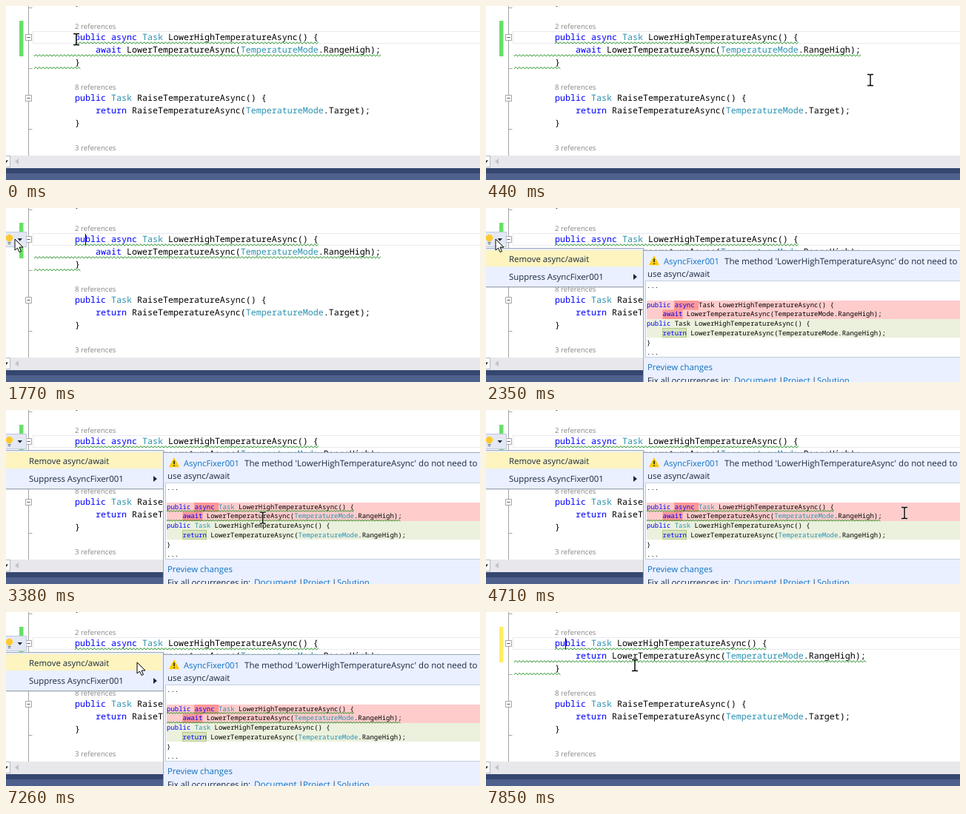
Animation, 640 px wide and 235 px high, one loop 8000 ms. Source, as an HTML page:

```html
<!DOCTYPE html>
<html lang="en">
<head>
<meta charset="utf-8">
<title>Code fix preview</title>
<style>
  html, body { margin: 0; width: 100%; height: 100%; overflow: hidden; background: #fff; }
  svg { display: block; width: 640px; height: 235px; }
  text { white-space: pre; text-rendering: geometricPrecision; }
  .code { font: 11.67px "Noto Sans Mono", "DejaVu Sans Mono", monospace; }
  .small { font-size: 8.98px; }
  .ui { font: 11.4px "Open Sans", "Noto Sans", sans-serif; fill: #1b293e; }
  .lens { font: 9.65px "Open Sans", "Noto Sans", sans-serif; fill: #868686; }
  .link { fill: #0e70c0; }
  .key { fill: #0000ff; }
  .type { fill: #2b91af; }
  .wave { fill: none; stroke: #1c8f1c; stroke-width: 1; }
  .fold { fill: #fff; stroke: #a5a5a5; }
  .plain .type { fill: #000; }
  .plain .wave { display: none; }
</style>
</head>
<body>
<svg viewBox="0 0 640 235">
  <rect width="640" height="235" fill="#fff"/>
  <rect x="36.5" y="34.5" width="610" height="16" fill="none" stroke="#eaeaf2"/>
  <path class="fold" d="M30.5 0V203M30.5 2.5h5M30.5 84.5h5M30.5 166.5h5"/>
  <path class="fold" d="M26.5 38.5h8v8h-8zM26.5 120.5h8v8h-8z"/>
  <path d="M28.5 42.5h4M28.5 124.5h4" stroke="#555"/>
  <rect id="bar" x="18" y="20" width="5.500" height="48"/>

  <g class="lens">
    <text x="93" y="31">2 references</text>
    <text x="93" y="113">8 references</text>
    <text x="93" y="195">3 references</text>
  </g>
  <g id="editor" class="code"></g>
  <g id="before" class="code"></g>
  <g id="after" class="code"></g>
  <path id="caret" d="M107.5 35V50" stroke="#000"/>

  <rect y="202" width="640" height="17" fill="#e8e8ec"/>
  <rect x="-4.5" y="202.5" width="10" height="15" fill="#fcfcfc" stroke="#b4b8c4"/>
  <path d="M-3 208.500h6l-3 3.500z" fill="#1e1e1e"/>
  <path d="M17 206v8l-5-4z" fill="#c2c3c9"/>
  <rect y="219" width="640" height="7" fill="#35476f"/>
  <rect y="226" width="640" height="9" fill="#4e608c"/>

  <g id="bulb">
    <rect x="-2.500" y="32.500" width="30" height="20" fill="#e3e8f3" stroke="#c0c9dd"/>
    <circle cx="4.500" cy="40.500" r="4.700" fill="#ffc92e"/>
    <path d="M2.500 43h4v2h-4z" fill="#ffc92e"/>
    <path d="M2.500 46.500h4M3 48.500h3" stroke="#666"/>
    <path d="M15.500 41h6.500l-3.250 3.700z" fill="#1b293e"/>
  </g>

  <g id="menu">
    <rect x="-1" y="56" width="215" height="52" fill="#000" opacity=".1"/>
    <rect x="-2" y="54.500" width="214.500" height="52" fill="#eaf0ff" stroke="#9ba7b7"/>
    <rect y="57" width="211" height="22" fill="#fdf4bf"/>
    <text class="ui" x="31" y="72.500">Remove async/await</text>
    <text class="ui" x="31" y="97">Suppress AsyncFixer001</text>
    <path d="M199 89v8l5-4z" fill="#1b293e"/>
  </g>

  <g id="popup">
    <rect x="212.500" y="57.500" width="440" height="190" fill="#eaf0ff" stroke="#9ba7b7"/>
    <rect x="215.500" y="98.500" width="440" height="103" fill="#fff" stroke="#c5cede"/>
    <path d="M227 65.500l6 11h-12z" fill="#ffcc00" stroke="#ffcc00" stroke-width="1.500" stroke-linejoin="round"/>
    <path d="M227 68.500v4.500M227 74.500v1.500" stroke="#111" stroke-width="1.500"/>
    <g class="ui">
      <text class="link" x="240" y="76" style="font-size:11.250px">AsyncFixer001</text>
      <text x="322" y="76" style="font-size:11.550px">The method 'LowerHighTemperatureAsync' do not need to</text>
      <text x="218" y="92.500">use async/await</text>
      <text class="link" x="218" y="218.500">Preview changes</text>
      <text x="218" y="237" style="font-size:11.300px">Fix all occurrences in:</text>
      <text class="link" x="335" y="237" style="font-size:11.800px">Document</text>
      <text x="395" y="237">|</text>
      <text class="link" x="401" y="237">Project</text>
      <text x="440" y="237">|</text>
      <text class="link" x="447" y="237">Solution</text>
    </g>
    <rect x="217" y="125" width="423" height="25" fill="#ffcccc"/>
    <path d="M254 125h33v12.500h-33zM238.500 137.500h27v12.500h-27z" fill="#ff9797"/>
    <rect x="217" y="150" width="423" height="25" fill="#ebf1dd"/>
    <rect x="238.500" y="162.500" width="32" height="12" fill="#d7e3bc" stroke="#b5c98a"/>
    <g id="diff" class="code small"></g>
  </g>

  <g id="pointer">
    <path id="arrow" d="M0 0V15L3.500 12L6 17.500L8.500 16.500L6 11H11Z" fill="#fff" stroke="#000" stroke-linejoin="round"/>
    <g id="beam" fill="none">
      <path d="M-4 -7.500H4M-4 7.500H4M0 -7.500V7.500" stroke="#fff" stroke-width="3" opacity=".6"/>
      <path d="M-4 -7.500H-1L0 -6.500L1 -7.500H4M-4 7.500H-1L0 6.500L1 7.500H4M0 -7V7" stroke="#000" stroke-width="1.400"/>
    </g>
  </g>
</svg>
<script>
const el = id => document.getElementById(id);

const paint = line => line
  .replace(/\b(public|async|await|return)\b/g, '<tspan class=key>$1</tspan>')
  .replace(/\b(Task|TemperatureMode)\b/g, '<tspan class=type>$1</tspan>')
  .replace(/class=(\w+)/g, 'class="$1"');

function code(id, x, lines) {
  el(id).innerHTML += lines.map(([y, line]) => `<text x="${x}" y="${y}">${paint(line)}</text>`).join('');
}

function wave(id, y, from, to, step, height) {
  let d = `M${from} ${y + height}`;
  for (let x = from + step, i = 0; x <= to; x += step, i++) d += `L${x} ${y + (i % 2) * height}`;
  el(id).innerHTML += `<path class="wave" d="${d}"/>`;
}

const oldHead = 'public async Task LowerHighTemperatureAsync() {';
const newHead = 'public Task LowerHighTemperatureAsync() {';
const oldBody = '    await LowerTemperatureAsync(TemperatureMode.RangeHigh);';
const newBody = '    return LowerTemperatureAsync(TemperatureMode.RangeHigh);';

code('editor', 93, [
  [-1, '}'], [80, '}'],
  [128, 'public Task RaiseTemperatureAsync() {'],
  [145, '    return RaiseTemperatureAsync(TemperatureMode.Target);'],
  [162, '}']
]);
wave('editor', 82.5, 38, 102, 2.4, 2.2);

for (const [id, head, body, headEnd, bodyEnd] of [
  ['before', oldHead, oldBody, 422, 508],
  ['after', newHead, newBody, 380, 515]
]) {
  code(id, 93, [[46, head], [63, body]]);
  wave(id, 48.7, 93, headEnd, 2.4, 2.2);
  wave(id, 65.7, 38, bodyEnd, 2.4, 2.2);
}

code('diff', 217, [
  [108, '...'], [133.5, oldHead], [146, oldBody],
  [159, newHead], [171.5, newBody], [184.5, '}'], [197.5, '...']
]);
wave('diff', 135.7, 217, 470, 1.9, 1.5);
wave('diff', 148.5, 217, 533, 1.9, 1.5);

// Pointer path: tick, x, y
const path = [
  [0, 95, 45], [1, 130, 48], [2, 330, 62], [3, 519, 100], [4, 250, 141], [5, 43, 42],
  [6, 20, 44], [8, 2, 46], [9, 2, 46], [12, 12, 42], [16, 13, 42], [17, 29, 57],
  [19, 180, 70], [22, 400, 140], [25, 240, 157], [26, 220, 115], [28, 440, 160],
  [29, 400, 208], [31, 571, 160], [32, 565, 139], [35, 565, 139], [36, 588, 186],
  [43, 440, 174], [46, 300, 115], [49, 177, 68], [50, 177, 68], [53, 201, 72]
];

function locate(tick) {
  const next = path.findIndex(p => p[0] >= tick);
  const b = path[next], a = path[Math.max(0, next - 1)];
  const k = b === a ? 0 : (tick - a[0]) / (b[0] - a[0]);
  return [a[1] + (b[1] - a[1]) * k, a[2] + (b[2] - a[2]) * k];
}

const show = (id, on) => el(id).style.display = on ? '' : 'none';

function draw(now) {
  const tick = Math.min(53, Math.floor((now % 8000 + 25) / 147.8));
  const [x, y] = locate(tick);
  const open = tick >= 14 && tick < 50;
  const fixed = tick >= 51;
  const overText = open ? x > 214 && y > 99 && y < 185 : x > 36;

  show('before', !fixed);
  show('after', fixed);
  el('bar').setAttribute('fill', fixed ? '#ffee62' : '#66e066');
  show('bulb', tick >= 10 && tick < 50);
  show('menu', open);
  show('popup', tick >= 15 && tick < 50);
  // The preview gets its type colours and squiggles a moment after opening.
  el('diff').classList.toggle('plain', tick < 19);
  show('caret', (tick >= 4 && tick < 7) || (tick >= 10 && tick < 14) || fixed);
  show('pointer', tick < 37 || tick >= 43);
  show('arrow', !overText);
  show('beam', overText);
  el('pointer').setAttribute('transform', `translate(${x} ${y})`);
}

const start = performance.now();
function loop() {
  draw(performance.now() - start);
  requestAnimationFrame(loop);
}
loop();
</script>
</body>
</html>
```
